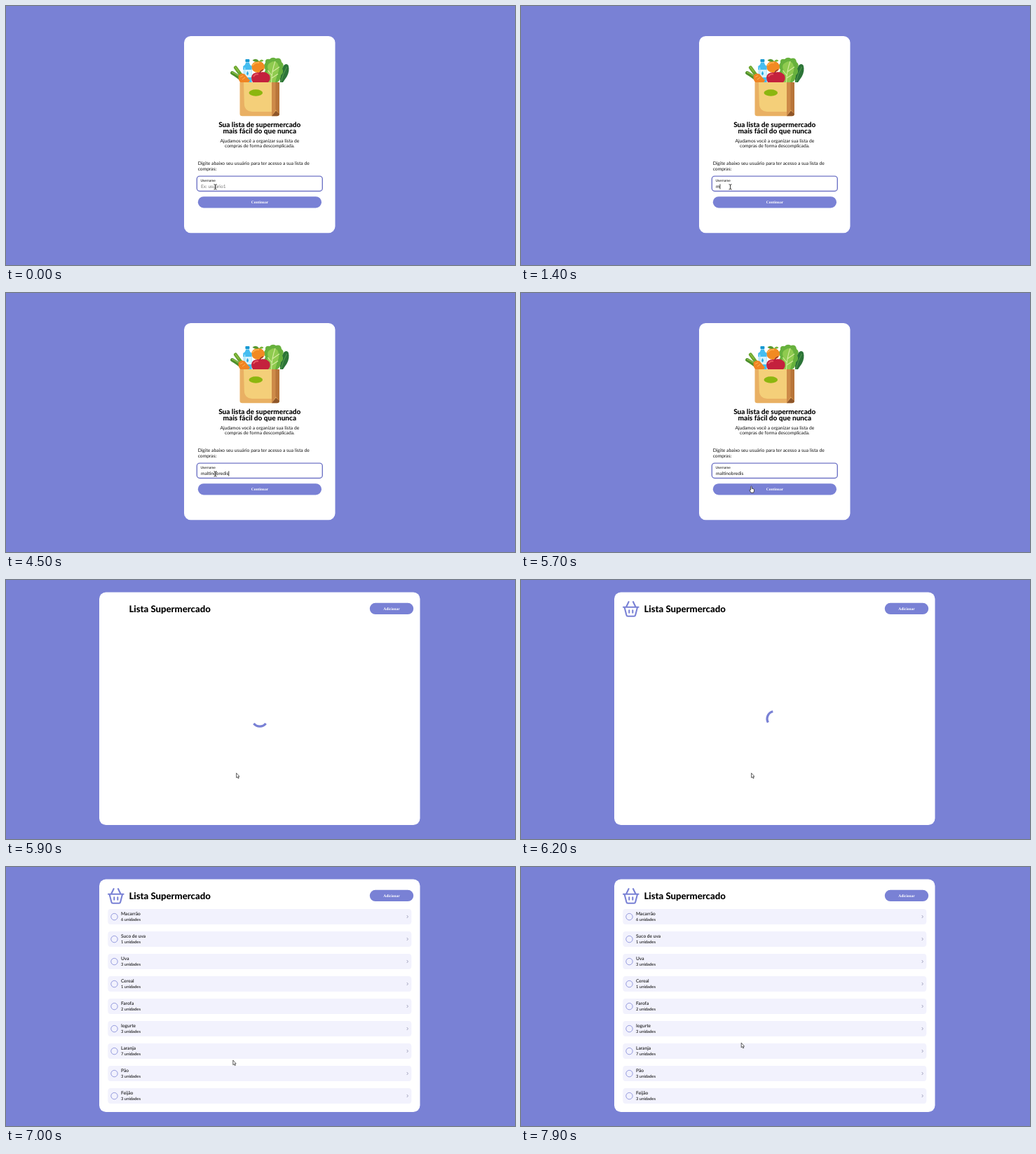
Recreate the animation shown at these times as an HTML page. Size 726 by 370 pixels, loop 8 s.

```html
<!DOCTYPE html>
<html lang="pt-BR">
<head>
<meta charset="utf-8">
<title>Lista Supermercado</title>
<style>
  html, body { margin: 0; width: 100%; height: 100%; overflow: hidden; background: #7981d5; }
  svg { display: block; width: 726px; height: 370px; }
  text { font-family: Lato, "Open Sans", sans-serif; font-size: 6.72px; fill: #111; text-rendering: geometricPrecision; }
  .title { font-size: 10.05px; font-weight: 800; fill: #000; }
  .head { font-size: 13.2px; font-weight: 800; fill: #000; }
  .mid { text-anchor: middle; }
  .label { font-size: 4.8px; font-weight: 500; }
  .field { font-size: 6.6px; }
  .hint { fill: #757575; }
  .btn { font: bold 5.5px "Liberation Serif", "Times New Roman", serif; fill: #fff; text-anchor: middle; }
  .name { font-size: 6.65px; font-weight: 500; }
  .qty { font-size: 5.85px; font-weight: 500; }
  .accent { fill: #7981d5; }
  .line { fill: none; stroke: #7981d5; }
</style>
</head>
<body>
<svg viewBox="0 0 726 370">
  <rect width="726" height="370" class="accent"/>

  <g id="login">
    <rect x="254" y="43" width="215.5" height="281.2" rx="9.5" fill="#fff"/>

    <g id="groceries">
      <g fill="none" stroke-linecap="round">
        <path d="M322.6 95.5Q328 98.5 335 104" stroke="#4d8f2c" stroke-width="5"/>
        <path d="M327.4 88Q331 93 337 101" stroke="#6aa52f" stroke-width="5"/>
        <path d="M322.5 94.6Q327 96.4 331 99.4M327.2 87.4L332 93.6" stroke="#92c343" stroke-width="1.2"/>
      </g>
      <path d="M391 109Q390 94 396 85Q400 81 402.8 85Q405 93 400.5 101L395 109Z" fill="#2c7438"/>
      <path d="M392 109Q395 97 400.5 87" fill="none" stroke="#57a04c"/>
      <path d="M369 109Q366 99 370 91Q366 86 370 81Q369 75 376 76Q380 72 385 75Q392 73 393 80Q398 84 394 89Q397 95 392 99Q392 106 387 109Z" fill="#67b13d"/>
      <path d="M374 109Q370 99 374 91Q371 84 377 81Q384 76 388 83Q391 91 387 98L384 109Z" fill="#8fcb4f"/>
      <path d="M378.5 109Q379 93 384 79M379 99L373.5 92M380 94L390 87M379 103L388 97" fill="none" stroke="#d5eba0" stroke-width="1.1"/>
      <ellipse cx="359.5" cy="87" rx="9.5" ry="8.2" fill="#f28a22"/>
      <path d="M351.5 85Q355 80 361 81" fill="none" stroke="#ffb04a" stroke-width="1.8"/>
      <path d="M351.5 77.5Q357 73.5 361 79Q355 81 351.5 77.5Z" fill="#57982f"/>
      <path d="M361 79Q364 74.5 367.5 78Q365 81 361 79Z" fill="#78b53a"/>
      <rect x="341.4" y="76" width="6" height="4" rx="1" fill="#1598d2"/>
      <path d="M342 80.5H347Q347.3 84 350.6 86V109H338.2V86Q341.7 84 342 80.5Z" fill="#45bdf0"/>
      <path d="M338.2 91H350.6V102H338.2Z" fill="#d5f2fd"/>
      <path d="M340.6 88V109" stroke="#9ee2fb" stroke-width="1.3"/>
      <path d="M344.5 93Q347.5 97 344.5 99Q341.5 97 344.5 93Z" fill="#2aa9e0"/>
      <path d="M331.5 99.5Q335 94.5 340.5 97.5L348 106.5L346 109H334Q331 105 331.5 99.5Z" fill="#f08423"/>
      <path d="M334 101.5L338 99.5M337 105L341 102" stroke="#ffb35a" stroke-width="1"/>
      <path d="M350 102Q351 94 361 95Q371 92.5 376 99Q378 105 374 109H352Q350 106 350 102Z" fill="#c4213d"/>
      <path d="M353 101Q355 97 360 97.5" fill="none" stroke="#ea5963" stroke-width="1.8"/>
      <path d="M362 95.5Q363 92 367 91" fill="none" stroke="#7a1a36" stroke-width="1.2"/>

      <path d="M333.5 109H390V154Q390 157.3 386.5 157.3H337Q333.5 157.3 333.5 154Z" fill="#e9b063"/>
      <path d="M339 109H379V151H351Q339.8 150 339.8 139Z" fill="#f4cf79"/>
      <path d="M379 109H390V154L385 148L379 157.3Z" fill="#cd8a48"/>
      <path d="M384.5 109H390V154L384.5 148Z" fill="#b87539"/>
      <path d="M379 157.3L385 149.5L390 154Q389.8 157.3 386.5 157.3Z" fill="#8f5629"/>
      <ellipse cx="356.3" cy="124" rx="9.8" ry="4.7" fill="#8cb60f"/>
    </g>

    <text class="title mid" x="361.8" y="173">Sua lista de supermercado</text>
    <text class="title mid" x="361.8" y="181.5">mais fácil do que nunca</text>
    <text class="mid" x="361.8" y="194.8">Ajudamos você a organizar sua lista de</text>
    <text class="mid" x="361.8" y="202.3">compras de forma descomplicada.</text>
    <text x="273.7" y="227.3">Digite abaixo seu usuário para ter acesso a sua lista de</text>
    <text x="273.7" y="234.8">compras:</text>

    <rect x="272.3" y="243.1" width="179" height="21.4" rx="4" fill="#fff" stroke="#7075c6" stroke-width="1.4"/>
    <text class="label" x="277.4" y="251.1">Username</text>
    <text class="field hint" id="hint" x="278" y="260.2">Ex: usuário1</text>
    <text class="field" id="typed" x="278" y="260.2"></text>
    <rect id="caret" y="254.4" width=".8" height="7.2" fill="#111"/>

    <rect x="273.8" y="272.2" width="176.2" height="16.2" rx="8.1" class="accent"/>
    <text class="btn" x="361.9" y="282">Continuar</text>
  </g>

  <g id="shop">
    <rect x="133" y="17.5" width="457.5" height="332.5" rx="9.5" fill="#fff"/>
    <text class="head" x="175.4" y="45.5">Lista Supermercado</text>
    <rect x="518.8" y="32.8" width="62.4" height="16.3" rx="8.1" class="accent"/>
    <text class="btn" x="550" y="42.7">Adicionar</text>

    <g id="basket" class="line" stroke-width="2.1" stroke-linecap="round" stroke-linejoin="round">
      <path d="M146 38.7H167.6M150.3 38L153.6 31.2M163.3 38L160 31.2"/>
      <path d="M147.7 39.5L150.4 50Q150.8 51.8 152.5 51.8H161.1Q162.8 51.8 163.2 50L165.9 39.5"/>
      <path d="M154.3 43.4V46.8M159.3 43.4V46.8"/>
    </g>
    <path id="spin" class="line" stroke-width="3.3"/>
    <g id="rows"></g>
  </g>

  <g id="ibeam" fill="none">
    <path d="M-2 -3.6Q0 -3.6 0 -2.6Q0 -3.6 2 -3.6M0 -2.8V2.8M-2 3.6Q0 3.6 0 2.6Q0 3.6 2 3.6" stroke="#222" stroke-width=".9"/>
  </g>
  <path id="hand" d="M-1.6 .8V-3.9Q-.8 -5.1 0 -3.9V-1.2L2.2 -.7Q3.2 -.4 3.2 .6V2.4L2.4 4.8H-1.2L-3.3 1.4Q-3.2 .2 -2.2 .6Z" fill="#fff" stroke="#222" stroke-width=".8" stroke-linejoin="round"/>
  <path id="arrow" d="M0 0V6.7L1.5 5.4L2.5 7.7L3.6 7.2L2.6 5H4.4Z" fill="#fff" stroke="#222" stroke-width=".7" stroke-linejoin="round"/>
</svg>

<script>
const LOOP = 8000, PAGE = 5900, ICON = 6100, LIST = 6800;
const USER = "maltinobredis";
const ITEMS = [["Macarrão", 6], ["Suco de uva", 1], ["Uva", 3], ["Cereal", 1], ["Farofa", 2],
  ["Iogurte", 3], ["Laranja", 7], ["Pão", 3], ["Feijão", 3]];

// [time, letters typed]
const TYPING = [[0, 0], [1400, 1], [1700, 2], [1800, 3], [2300, 4], [2700, 6],
  [3400, 9], [3800, 10], [4200, 12], [4500, 13]];

// [time, pointer, x, y]
const POINTER = [
  [0, "ibeam", 298.5, 258.4], [5500, "ibeam", 305, 262.3], [5600, "hand", 321, 275], [5700, "hand", 329.3, 280.5],
  [5900, "arrow", 328.6, 275.8], [7000, "arrow", 323.8, 276], [7400, "arrow", 323, 273.5], [7500, "arrow", 321, 268],
  [7600, "arrow", 318.5, 261], [7700, "arrow", 316.3, 255.5], [7800, "arrow", 315, 252.5], [7900, "arrow", 314.2, 251.2]
];

const $ = id => document.getElementById(id);
const show = (id, on) => { $(id).style.display = on ? "" : "none"; };
const stepAt = (table, t) => table.filter(s => s[0] <= t).pop();

$("rows").innerHTML = ITEMS.map(([name, n], i) => `
  <g transform="translate(0 ${i * 32})">
    <rect x="145.3" y="60" width="433" height="22" rx="4" fill="#f2f2fd"/>
    <circle cx="154.5" cy="71.1" r="4.7" fill="none" stroke="#8b91da" stroke-width=".9"/>
    <text class="name" x="164" y="69.3">${name}</text>
    <text class="qty" x="164" y="77.4">${n} unidades</text>
    <path d="M571.7 69L573.5 71L571.7 73" fill="none" stroke="#8d8fac" stroke-width=".8"/>
  </g>`).join("");

function arc(mid) {
  const at = deg => {
    const a = deg * Math.PI / 180;
    return `${362 + 10.9 * Math.cos(a)} ${198.3 + 10.9 * Math.sin(a)}`;
  };
  return `M${at(mid - 52)}A10.9 10.9 0 0 1 ${at(mid + 52)}`;
}

function draw(t) {
  const login = t < PAGE;
  show("login", login);
  show("shop", !login);

  if (login) {
    const count = stepAt(TYPING, t)[1];
    $("typed").textContent = USER.slice(0, count);
    show("hint", !count);
    show("caret", t >= 700 && t < 5500);
    const width = count ? $("typed").getComputedTextLength() : 0;
    $("caret").setAttribute("x", 278.1 + width);
  } else {
    show("basket", t >= ICON);
    show("rows", t >= LIST);
    show("spin", t < LIST);
    // The spinner ticks every 100 ms
    const tick = Math.floor((t - PAGE) / 100);
    $("spin").setAttribute("d", arc(90 + tick * 37.9));
  }

  const [, kind, x, y] = stepAt(POINTER, t);
  for (const id of ["ibeam", "hand", "arrow"]) show(id, id === kind);
  $(kind).setAttribute("transform", `translate(${x} ${y})`);
}

const start = performance.now();
function frame(now) {
  draw(Math.max(0, now - start) % LOOP);
  requestAnimationFrame(frame);
}
draw(0);
requestAnimationFrame(frame);
</script>
</body>
</html>
```
